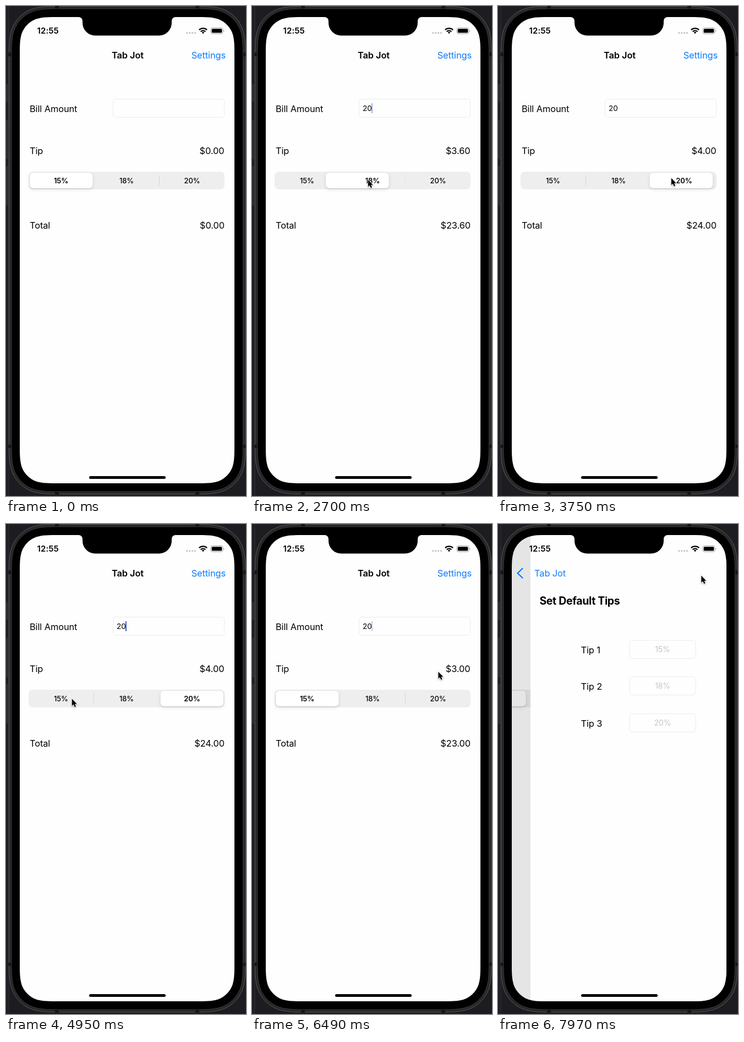
These frames come from a looping animation (436x887 px, 7.99 s). An HTML page:

```html
<!DOCTYPE html>
<html lang="en">
<head>
<meta charset="utf-8">
<title>Tip calculator</title>
<style>
html, body { margin: 0; width: 100%; height: 100%; overflow: hidden; background: #1d1c21; }
svg { display: block; width: 100%; height: 100%; }
text { font: 400 16.4px Inter, "Open Sans", sans-serif; letter-spacing: -.1px; white-space: pre; }
.end { text-anchor: end; }
.mid { text-anchor: middle; }
.bold { font-weight: 600; }
.blue { fill: #087bff; }
.small { font-size: 13.6px; }
.seg text { font-size: 13px; font-weight: 500; letter-spacing: -.1px; text-anchor: middle; }
.clock { font-size: 15px; font-weight: 600; letter-spacing: .1px; }
.head { font-size: 19.5px; font-weight: 700; letter-spacing: -.35px; }
.hint { font-size: 13.8px; fill: #c5c5c7; text-anchor: middle; }
.field { fill: #fefefe; stroke: #ebebeb; }
#pill { filter: drop-shadow(0 1px 1px rgba(0,0,0,.1)) drop-shadow(0 2px 3px rgba(0,0,0,.1)); }
#mouse { filter: drop-shadow(0 1px 1px rgba(0,0,0,.35)); }
</style>
</head>
<body>
<svg viewBox="0 0 436 887" preserveAspectRatio="none">
  <defs>
    <clipPath id="screen"><path id="glass"/></clipPath>
    <linearGradient id="side"><stop stop-color="#19181d"/><stop offset="1" stop-color="#29282e"/></linearGradient>
  </defs>

  <!-- phone body -->
  <rect width="436" height="887" fill="#1d1c21"/>
  <rect width="6" height="887" fill="url(#side)"/>
  <g fill="#29292b" stroke="#4a4a4d" stroke-width=".8">
    <rect x="1.4" y="142.4" width="5" height="30" rx="1"/>
    <rect x="1.4" y="206.4" width="5" height="70" rx="1"/>
    <rect x="1.4" y="290.4" width="5" height="70" rx="1"/>
  </g>
  <path id="shell" fill="#272729" stroke="#58585a"/>
  <g fill="#151517">
    <path d="M89 0h7v6h-7zM344 0h7v6h-7zM89 878h7v6h-7zM344 878h7v6h-7z"/>
    <path d="M5 84h6v7H5zM429 84h6v7h-6zM5 794h6v6H5zM429 794h6v6h-6z"/>
  </g>
  <path id="bezel" fill="#000" stroke="#39393b"/>

  <g clip-path="url(#screen)">
    <rect x="25" y="20" width="390" height="844" fill="#fefefe"/>
    <g id="home">
      <text x="43" y="192">Bill Amount</text>
      <rect class="field" x="194.5" y="168.5" width="202" height="33" rx="4.5"/>
      <text id="bill" class="small" x="201" y="190"></text>
      <rect id="caret" y="176" width="2" height="18" rx=".6" fill="#3b66d4"/>
      <text x="43" y="268">Tip</text>
      <text id="tip" class="end" x="396.5" y="268"></text>
      <g class="seg">
        <rect x="41" y="300" width="356" height="32" rx="7.5" fill="#eeeeef"/>
        <rect id="line1" x="159" y="307" width="1" height="18" fill="#d6d6d8"/>
        <rect id="line2" x="278" y="307" width="1" height="18" fill="#d6d6d8"/>
        <rect id="pill" y="302" width="114.5" height="28" rx="6.5" fill="#fff"/>
        <text x="100" y="321">15%</text>
        <text x="219" y="321">18%</text>
        <text x="338" y="321">20%</text>
      </g>
      <text x="43" y="403">Total</text>
      <text id="total" class="end" x="397" y="403"></text>
    </g>
    <rect id="dim" x="25" y="20" width="390" height="844" fill="#000"/>
    <g id="prefs">
      <rect x="25" y="20" width="390" height="844" fill="#fefefe"/>
      <text class="head" x="41.5" y="146">Set Default Tips</text>
    </g>

    <!-- navigation bar -->
    <text id="name" class="bold" y="95">Tab Jot</text>
    <text id="back" class="blue" y="95">Tab Jot</text>
    <path id="arrow" d="M44.5 80.5L35.5 89L44.5 97.5" fill="none" stroke="#087bff" stroke-width="2.3" stroke-linecap="round" stroke-linejoin="round"/>
    <text id="gear" class="blue end" x="399" y="95">Settings</text>

    <!-- status bar -->
    <path d="M132 19H308V20a7 7 0 0 0-7 7v3.5a23 23 0 0 1-23 23H162a23 23 0 0 1-23-23V27a7 7 0 0 0-7-7z"/>
    <text class="clock" x="56.5" y="50">12:55</text>
    <g fill="#c6c6c8">
      <circle cx="328.8" cy="48.8" r="1.7"/><circle cx="333.7" cy="48.8" r="1.7"/>
      <circle cx="338.6" cy="48.8" r="1.7"/><circle cx="343.5" cy="48.8" r="1.7"/>
    </g>
    <g fill="none" stroke="#000" stroke-width="2.3">
      <path d="M350.8 43.3a10.3 10.3 0 0 1 14.4 0M353.7 46.3a6.3 6.3 0 0 1 8.6 0"/>
      <path d="M358 50.3l-2.2-2.4a3.2 3.2 0 0 1 4.4 0z" fill="#000" stroke="none"/>
    </g>
    <rect x="372" y="39.5" width="22" height="10.8" rx="3" fill="none" stroke="#a2a2a2"/>
    <rect x="373.7" y="41.2" width="18.6" height="7.4" rx="1.6"/>
    <path d="M395.4 43.2a2 2 0 0 1 0 3.6z" fill="#a2a2a2"/>
    <rect x="151" y="851" width="139" height="5" rx="2.5"/>
  </g>

  <path id="mouse" d="M.8 1.6V14.2L3.7 11.5L5.8 16.2L8 15.2L6 10.7H9.8Z" stroke="#fff" stroke-width="1.7" paint-order="stroke"/>
</svg>

<script>
const LOOP = 7990, PUSH = 7670, PRESS = 7630;
const RATES = [15, 18, 20];
const KEYS = [[0, ''], [840, '2'], [1180, '20']];
const TAPS = [[0, 0], [2537, 1], [3460, 2], [5790, 0]];
const CARET_X = [201, 208.5, 217];
// time, x, y of the pointer tip
const TRAIL = [
  [1810, 440, 252], [2120, 262, 297], [2300, 203, 318], [2420, 210, 313],
  [3060, 210, 313], [3400, 314, 310], [3800, 314, 310], [4120, 153, 314],
  [4600, 119, 315], [5940, 119, 315], [6300, 296, 291], [6490, 337.5, 266],
  [6570, 343, 258], [6980, 373, 102], [7160, 368.5, 92], [LOOP, 368.5, 92]
];
// half of a smooth corner, in radii along each edge; the rest is its mirror
const HALF = [[1.529, 0], [1.088, 0], [.868, 0], [.631, .075], [.373, .169]];
const CORNER = [...HALF, ...HALF.map(([a, b]) => [b, a]).reverse()];

const $ = id => document.getElementById(id);
const clamp = v => Math.max(0, Math.min(1, v));
const spring = (ms, rate) => {
  const x = Math.max(0, ms) * rate / 1000;
  return 1 - (1 + x) * Math.exp(-x);
};
const latest = (list, t) => list.filter(s => s[0] <= t).pop();
const fade = (el, v) => el.setAttribute('opacity', v.toFixed(3));
const shift = (el, x, y = 0) => el.setAttribute('transform', `translate(${x.toFixed(2)} ${y.toFixed(2)})`);
const names = ['home', 'bill', 'caret', 'tip', 'total', 'line1', 'line2', 'pill',
  'dim', 'prefs', 'name', 'back', 'arrow', 'gear', 'mouse'];
const ui = Object.fromEntries(names.map(n => [n, $(n)]));
const segs = document.querySelectorAll('.seg text');

function smoothBox(id, x, y, w, h, r) {
  const corners = [[x + w, y, -1, 0], [x + w, y + h, 0, -1], [x, y + h, 1, 0], [x, y, 0, 1]];
  const d = corners.map(([cx, cy, ux, uy], i) => {
    const pts = CORNER.map(([a, b]) => `${cx + r * (a * ux + b * uy)} ${cy + r * (a * uy - b * ux)}`);
    return (i ? 'L' : 'M') + pts[0] + 'C' + pts.slice(1).join(' ');
  });
  $(id).setAttribute('d', d.join('') + 'Z');
}
smoothBox('shell', 5.5, .5, 429.5, 883, 66);
smoothBox('bezel', 10, 5, 420.5, 874, 62);
smoothBox('glass', 25, 20, 390, 844, 47.3);

RATES.forEach((rate, i) => {
  const y = [210.5, 276.5, 343.5][i];
  ui.prefs.insertAdjacentHTML('beforeend',
    `<text x="116.5" y="${y + 23.5}">Tip ${i + 1}</text>
     <rect class="field" x="205" y="${y}" width="120" height="33" rx="4.5"/>
     <text class="hint" x="265" y="${y + 21.5}">${rate}%</text>`);
});

// smooth path through the trail, at rest where neighbours are equal
function slope(i, k) {
  const a = TRAIL[i - 1], b = TRAIL[i], c = TRAIL[i + 1];
  if (!a || !c) return 0;
  const still = p => p[1] === b[1] && p[2] === b[2];
  return still(a) || still(c) ? 0 : (c[k] - a[k]) / (c[0] - a[0]);
}
function along(t, k) {
  const i = Math.min(TRAIL.length - 2, TRAIL.findLastIndex(p => p[0] <= t));
  const a = TRAIL[i], b = TRAIL[i + 1], d = b[0] - a[0];
  const u = (t - a[0]) / d, e = u * u * (3 - 2 * u);
  return a[k] + (b[k] - a[k]) * e
    + d * u * (1 - u) * ((1 - u) * slope(i, k) - u * slope(i + 1, k));
}

function caretAlpha(t) {
  if (t >= PRESS) return 0;
  if (t < 1720) return clamp((t - 170) / 120);
  const u = (t - 1720) % 945;
  return u < 310 ? clamp(1 - u / 72) : clamp((u - 310) / 80);
}

function pillX(t) {
  const x = i => 43 + 118.8 * i;
  const [at, now] = latest(TAPS, t);
  const past = TAPS[TAPS.findIndex(s => s[0] === at) - 1];
  return past ? x(past[1]) + (x(now) - x(past[1])) * spring(t - at, 17) : x(now);
}

function draw(t) {
  const bill = latest(KEYS, t)[1], pick = latest(TAPS, t)[1];
  const tip = bill * RATES[pick] / 100;
  ui.bill.textContent = bill;
  ui.tip.textContent = '$' + tip.toFixed(2);
  ui.total.textContent = '$' + (+bill + tip).toFixed(2);
  ui.caret.setAttribute('x', CARET_X[bill.length]);
  fade(ui.caret, caretAlpha(t));

  const x = pillX(t), place = (x - 43) / 118.8;
  ui.pill.setAttribute('x', x.toFixed(2));
  segs.forEach((s, i) => { s.style.fontWeight = i === pick ? 600 : 500; });
  fade(ui.line1, clamp(place - 1));
  fade(ui.line2, clamp(1 - place));

  const p = spring(t - PUSH, 13.5);
  shift(ui.home, -117 * p);
  shift(ui.prefs, 390 * (1 - p));
  fade(ui.dim, .107 * p);
  const left = 192 - 138 * p;
  ui.name.setAttribute('x', left);
  ui.back.setAttribute('x', left);
  fade(ui.name, clamp(1 - p * 1.6));
  fade(ui.back, clamp(p * 1.4 - .3));
  fade(ui.arrow, clamp(p * 1.2 - .1));
  fade(ui.gear, t < PRESS ? 1 : .2 * clamp(1 - p * 2));

  const shown = t >= TRAIL[0][0];
  fade(ui.mouse, +shown);
  if (shown) shift(ui.mouse, along(t, 1), along(t, 2));
}

const start = performance.now();
function tick() {
  draw((performance.now() - start) % LOOP);
  requestAnimationFrame(tick);
}
tick();
</script>
</body>
</html>
```
